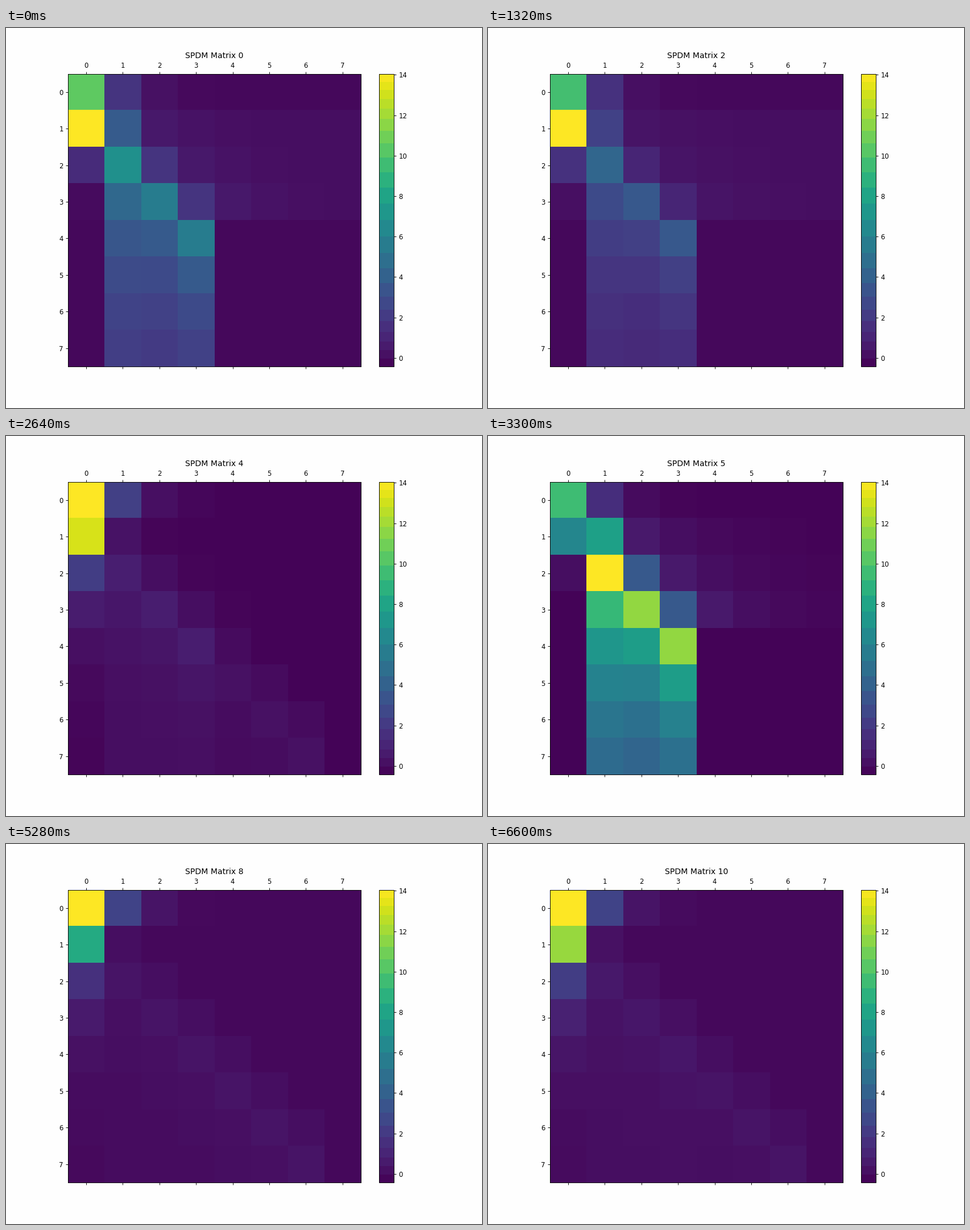
Write a matplotlib script that moves like this. It is 837 by 669 pixels and loops after 7260 ms.

```python
import numpy as np
import matplotlib.pyplot as plt
from matplotlib.animation import FuncAnimation
from matplotlib.cm import ScalarMappable
from matplotlib.colors import BoundaryNorm, ListedColormap

SIZE = 8
COUNT = 11
STEP_MS = 660
LOW, HIGH = -0.42, 14.05
BANDS = 24

row, col = np.indices((SIZE, SIZE))
below = row - col
inner = (row > 0) & (col > 0)


def trail(diagonal):
    """Peak just under the diagonal that fades downwards."""
    fade = np.maximum(below, 1) ** -0.6
    return np.where(below > 0, fade, np.where(below == 0, diagonal, 0))


def wake_shape():
    """Trails in columns 1 to 3 with a weak halo right of the diagonal."""
    first = col == 1
    core = trail(np.where(first, 0.56, 0.27)) * np.where(first | (below == 0), 1, 0.83)
    halo = np.where(below < 0, 0.06 * 0.5 ** (-below - 1.0), 0)
    return np.where(inner & (col <= 3), core, 0) + np.where(inner & (row <= 3), halo, 0)


WAKE = wake_shape()
LADDER = np.where(inner & (col < SIZE - 1), trail(0.5), 0)
HAZE = (row > 0) & (row <= 3) & (below < 0)


def matrix(n):
    """Shades in 0..1 for step n, from a few key points per component."""
    def key(steps, values):
        return np.interp(n, steps, values)

    base = key([0, 3, 4, 6, 8, 10], [.02, .02, .01, .008, .02, .022])
    head = key([0, 2, 4, 5, 6], [.73, .68, 1, .68, 1])
    drop = key([2, 4, 5, 6, 7, 8, 10], [1, .93, .45, .52, .54, .59, .825])
    wake = key([0, 2, 4, 5, 6, 8, 10], [.48, .31, .04, 1, 0, 0, .012])
    ladder = key([3, 4, 5, 6, 8, 10], [0, .035, 0, .02, .033, .03])
    haze = key([3, 4], [.015, 0])

    m = base + wake * WAKE + ladder * LADDER + haze * HAZE
    m[0] += head * 0.18 ** np.arange(SIZE)
    ratio = 0.2 / (1 + 2 * wake)
    m[1:, 0] += drop * ratio ** (np.arange(SIZE - 1) ** (0.6 + wake))
    return np.minimum(m, 1)


def banded_scale():
    """Viridis in flat steps, finer towards both ends."""
    u = np.linspace(0, 1, BANDS + 1)
    u -= 0.35 * np.sin(2 * np.pi * u) / (2 * np.pi)
    colors = plt.get_cmap("viridis")((u[:-1] + u[1:]) / 2)
    norm = BoundaryNorm(LOW + (HIGH - LOW) * u, BANDS)
    return ScalarMappable(norm, ListedColormap(colors))


fig, ax = plt.subplots(figsize=(10, 7.993), dpi=83.7, facecolor="#fefefe")
fig.subplots_adjust(left=0.1255, right=0.9005, bottom=0.1094, top=0.8794)
image = ax.matshow(matrix(0), cmap="viridis", vmin=0, vmax=1)
title = ax.set_title("SPDM Matrix 0", pad=5.5)
bar = fig.colorbar(banded_scale(), ax=ax, spacing="proportional",
                   ticks=range(0, 15, 2))
bar.minorticks_off()


def update(n):
    image.set_data(matrix(n))
    title.set_text(f"SPDM Matrix {n}")
    return image, title


anim = FuncAnimation(fig, update, frames=COUNT, interval=STEP_MS,
                     repeat=True, repeat_delay=0, blit=False)
plt.show()
```
